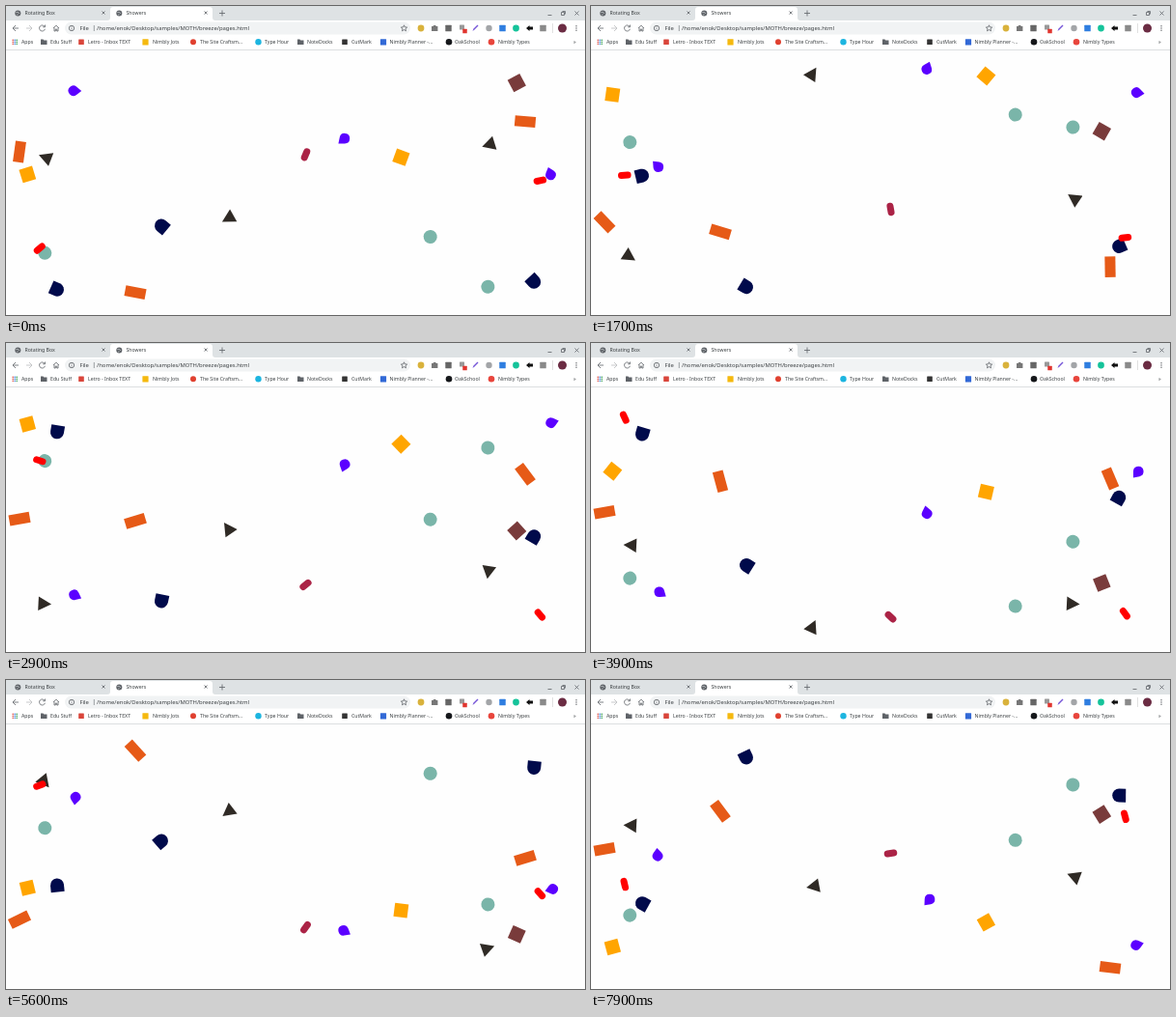
An HTML page for the animation above (8 s loop, 600 px wide and 320 px high).

```html
<!DOCTYPE html>
<html lang="en">
<head>
<meta charset="utf-8">
<title>Showers</title>
<style>
  html, body { margin: 0; width: 100%; height: 100%; overflow: hidden; background: #fefefe; }
  svg { display: block; width: 600px; height: 320px; }
  text { font: 5.2px "Noto Sans", sans-serif; fill: #3c4043; }
  .url { font-size: 5.9px; }
  .line { fill: none; stroke: #5f6368; stroke-width: .8; }
</style>
</head>
<body>
<svg viewBox="0 0 600 320">
  <rect width="600" height="320" fill="#fefefe"/>
  <g id="shapes"></g>
  <g id="chrome">
    <rect width="600" height="15" fill="#dee2e4"/>
    <path d="M105 15q3 0 3-3V4q0-3 3-3h100q3 0 3 3v8q0 3 3 3z" fill="#fff"/>
    <rect y="15" width="600" height="30" fill="#fff"/>
    <rect y="45" width="600" height=".8" fill="#d5d8da"/>
    <rect x="61" y="16.5" width="358" height="13" rx="6.5" fill="#f1f3f4"/>
    <path class="line" d="M99.5 5.5l3 3m0-3l-3 3M205.5 5.5l3 3m0-3l-3 3M221 7.5h6m-3-3v6M561.5 9.5h4M575.5 6.5h3v3h-3zM576.5 5.5h3v3M589.5 5.5l4 4m0-4l-4 4"/>
    <path class="line" d="M13 23H7m3-3l-3 3l3 3M40 21.3a3 3 0 1 0 .4 2.5M40.5 19.5v2.3h-2.3M49 23l3-2.8 3 2.8M50 22.500v3.500h1.300v-2h1.400v2H54v-3.500"/>
    <path class="line" d="M21 23h6m-3-3l3 3l-3 3" style="stroke:#babcbe"/>
    <g class="line"><circle cx="68" cy="23" r="2.7"/><path d="M68 22.5v2M68 21v.7M91.3 20v6" stroke-width=".6"/></g>
    <path class="line" d="M412.5 19.8l.9 2.1 2.3.2-1.7 1.5.5 2.2-2-1.2-2 1.2.5-2.2-1.7-1.5 2.3-.2z" stroke-width=".6"/>
    <path d="M566.5 18v10" stroke="#ccc" stroke-width=".6"/>
    <path d="M441 21h1.500l.7-1h2l.7 1h1.500v5h-6.400z" fill="#777"/>
    <path d="M483.5 26l1-2.5 4-4 1 1-4 4z" fill="#7656d8"/>
    <path d="M539 23l3.5-3v1.5h3.5v3h-3.5v1.5z" fill="#111"/>
  </g>
</svg>
<script>
const NS = 'http://www.w3.org/2000/svg';
const chrome = document.getElementById('chrome');
const layer = document.getElementById('shapes');

function add(parent, tag, attrs, text) {
  const el = document.createElementNS(NS, tag);
  for (const key in attrs) el.setAttribute(key, attrs[key]);
  if (text) el.textContent = text;
  return parent.appendChild(el);
}
const label = (x, y, text, cls = '') => add(chrome, 'text', { x, y, class: cls }, text);
const dot = (cx, cy, r, fill) => add(chrome, 'circle', { cx, cy, r, fill });
const box = (x, y, s, fill) => add(chrome, 'rect', { x: x - s / 2, y: y - s / 2, width: s, height: s, rx: .5, fill });

// Tabs and address bar
for (const x of [12.3, 117.3]) {
  dot(x, 7.5, 3, '#5f6368');
  add(chrome, 'path', { d: `M${x - 2} 6.5h2.5l1 1.5M${x - 1} 9.5l1-1.5`, stroke: '#dee2e4', 'stroke-width': .6, fill: 'none' });
}
label(19.5, 9.4, 'Rotating Box');
label(124.5, 9.4, 'Showers');
label(76.5, 25, 'File', 'url');
label(94, 25, '/home/enok/Desktop/samples/MOTH/breeze/pages.html', 'url');

// Toolbar buttons
dot(430, 23, 3.4, '#d9b23c');
box(458.5, 23, 6.4, '#666');
box(472.5, 22, 5, '#999');
box(475.5, 26, 4.5, '#e0352f');
dot(500.5, 23, 3.2, '#a3a5a8');
box(514.5, 23, 6.5, '#2f7ee0');
dot(528.5, 23, 3.4, '#15c39a');
box(556.5, 23, 6.5, '#8a8a8a');
dot(576.5, 23, 4.5, '#6b2c43');
for (const y of [20.7, 23, 25.3]) dot(591, y, .7, '#5f6368');

// Bookmarks
for (let i = 0; i < 9; i++)
  box(7.2 + i % 3 * 2, 35.3 + (i / 3 | 0) * 2, 1.4, ['#e2574c', '#4a86e8', '#3fa35b'][i % 3]);
for (const x of [36, 302])
  add(chrome, 'path', { d: `M${x} 34.5h2.5l.8.9h3.2v4.6h-6.500z`, fill: '#5f6368' });
box(78, 37.3, 5.6, '#d9453a');
box(144.5, 37.3, 6.2, '#f5b90f');
dot(194, 37.3, 3, '#e0402f');
dot(261.5, 37.3, 3.2, '#1cb5e0');
box(351, 37.3, 5.6, '#333');
box(391, 37.3, 6.2, '#3269d6');
dot(459, 37.3, 3.3, '#15171a');
dot(503, 37.3, 3.3, '#e8453c');
[[16, 'Apps'], [46, 'Edu Stuff'], [85, 'Letro - Inbox TEXT'], [152, 'Nimbly Jots'],
 [201, 'The Site Craftsm...'], [268, 'Type Hour'], [312, 'NoteDocks'], [358, 'CutMark'],
 [397.5, 'Nimbly Planner -...'], [465, 'OakSchool'], [510, 'Nimbly Types'], [588, '»']
].forEach(([x, text]) => label(x, 39.2, text));

// Each kind: height, fill, outline centred on its pivot
const bar = (w, h) => `M${-w / 2} ${-h / 2}h${w}v${h}h${-w}z`;
const pill = 'M-3.3-3.5h6.6a3.5 3.5 0 0 1 0 7h-6.600a3.5 3.5 0 0 1 0-7z';
const kinds = {
  triangle: [13.5, '#2f2a25', 'M0-6.75L7.3 6.75H-7.3z'],
  navy: [14, '#000a4b', 'M-7-7H0A7 7 0 0 1 0 7H-7z'],
  circle: [14, '#7ab5a9', 'M-7 0a7 7 0 0 1 14 0a7 7 0 0 1-14 0z'],
  yellow: [14.2, '#ffa500', bar(14.2, 14.2)],
  brown: [14.2, '#793b3b', bar(14.2, 14.2)],
  orange: [11, '#e65a17', bar(21.5, 11)],
  drop: [13.4, '#5b00ff', 'M-1.5-7.7L2.7-2.6A5.3 5.3 0 1 1-5.7-2.6z'],
  red: [7, '#ff0000', pill],
  crimson: [7, '#ab2346', pill]
};

// kind, x, seconds per crossing, starting phase (0..1 falls, 1..2 rises)
const pieces = [
  ['triangle', 40.3, 4, .404], ['triangle', 229.8, 2.39, 1.334], ['triangle', 499.8, 7.5, .351],
  ['navy', 161, 6.5, .695], ['navy', 53, 3.5, 1.033], ['navy', 547.2, 6, .934],
  ['circle', 439.7, 1.64, .742], ['circle', 499.4, 2.5, 1.045], ['circle', 40.3, 2, .811],
  ['yellow', 22.3, 5, 1.524], ['yellow', 409.4, 4.9, 1.597], ['brown', 529.3, 4.5, 1.914],
  ['orange', 14, 1, 1.614], ['orange', 538, 1.5, 1.743], ['orange', 134, 5.9, .985],
  ['drop', 70.5, 3, 1.873], ['drop', 349.5, 4.85, 1.679], ['drop', 565.7, 5, 1.525],
  ['red', 34.8, 5.45, 1.194], ['red', 553.4, 7, .517], ['crimson', 310.5, 7.3, .406]
].map(([kind, x, span, phase]) => {
  const [height, fill, d] = kinds[kind];
  return { x, span, phase, top: 51.7 + height / 2, el: add(layer, 'path', { d, fill }) };
});

const LOOP = 8000, STEP = 100, TRAVEL = 243;
const fold = u => 1 - Math.abs(1 - u % 2);

function draw(now) {
  const t = Math.floor(now % LOOP / STEP) * STEP / 1000;
  for (const { x, span, phase, top, el } of pieces) {
    const p = fold(phase + t / span);
    const turn = 360 * fold(2 * p);
    el.setAttribute('transform', `translate(${x} ${top + TRAVEL * p}) rotate(${turn})`);
  }
}

const start = performance.now();
function tick() {
  draw(performance.now() - start);
  requestAnimationFrame(tick);
}
tick();
</script>
</body>
</html>
```
